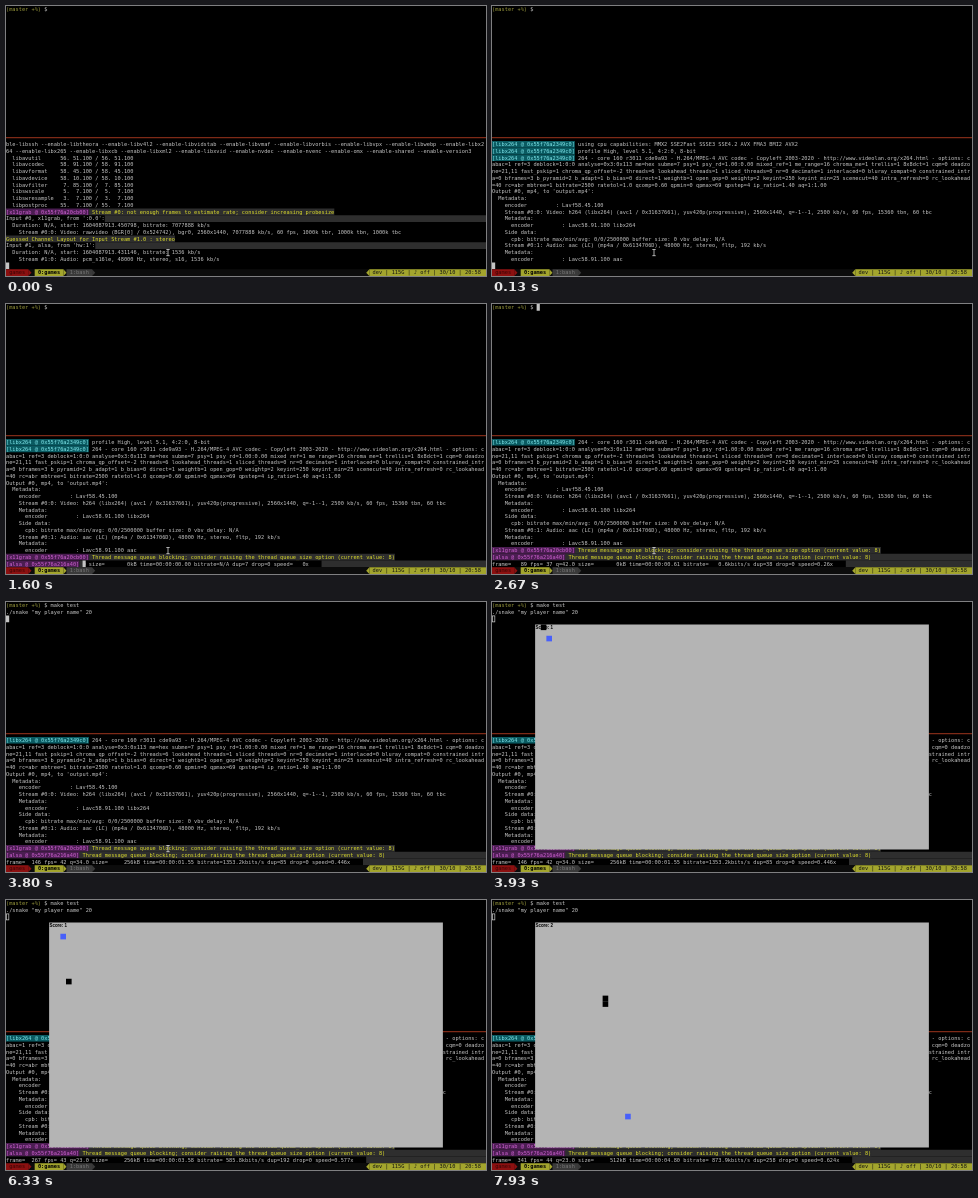
An HTML page with a canvas that plays this animation: 480x270 px, repeating every 8 s.

```html
<!DOCTYPE html>
<html lang="en">
<head>
<meta charset="utf-8">
<title>Terminal snake</title>
<style>
  html, body { margin: 0; width: 100%; height: 100%; overflow: hidden; background: #000; }
  canvas { display: block; }
</style>
</head>
<body>
<canvas width="480" height="270"></canvas>
<script>
const ctx = document.querySelector('canvas').getContext('2d');
const LOOP = 8000, COLS = 150, CW = 17, RH = 36;   // terminal cells on a 2560 x 1440 desktop
const MONO = '28.24px "DejaVu Sans Mono", monospace';
const FG = '#c4c4c4', GRAY = '#2e2e2e', WARN = '#dede2c', OLIVE = '#a3a52d';
const QUEUE = 'Thread message queue blocking; consider raising the thread_queue_size option (current value: 8)';
const X264 = '[libx264 @ 0x55f76a2349c0] ', GRAB = '[x11grab @ 0x55f76a20cb00] ', ALSA = '[alsa @ 0x55f76a216a40] ';

const log = `ble-libssh --enable-libtheora --enable-libv4l2 --enable-libvidstab --enable-libvmaf --enable-libvorbis --enable-libvpx --enable-libwebp --enable-libx264 --enable-libx265 --enable-libxcb --enable-libxml2 --enable-libxvid --enable-nvdec --enable-nvenc --enable-omx --enable-shared --enable-version3
  libavutil      56. 51.100 / 56. 51.100
  libavcodec     58. 91.100 / 58. 91.100
  libavformat    58. 45.100 / 58. 45.100
  libavdevice    58. 10.100 / 58. 10.100
  libavfilter     7. 85.100 /  7. 85.100
  libswscale      5.  7.100 /  5.  7.100
  libswresample   3.  7.100 /  3.  7.100
  libpostproc    55.  7.100 / 55.  7.100
${GRAB}Stream #0: not enough frames to estimate rate; consider increasing probesize
Input #0, x11grab, from ':0.0':
  Duration: N/A, start: 1604087913.450798, bitrate: 7077888 kb/s
    Stream #0:0: Video: rawvideo (BGR[0] / 0x524742), bgr0, 2560x1440, 7077888 kb/s, 60 fps, 1000k tbr, 1000k tbn, 1000k tbc
Guessed Channel Layout for Input Stream #1.0 : stereo
Input #1, alsa, from 'hw:1':
  Duration: N/A, start: 1604087913.431146, bitrate: 1536 kb/s
    Stream #1:0: Audio: pcm_s16le, 48000 Hz, stereo, s16, 1536 kb/s
Stream mapping:
  Stream #0:0 -> #0:0 (rawvideo (native) -> h264 (libx264))
  Stream #1:0 -> #0:1 (pcm_s16le (native) -> aac (native))
Press [q] to stop, [?] for help
${X264}using cpu capabilities: MMX2 SSE2Fast SSSE3 SSE4.2 AVX FMA3 BMI2 AVX2
${X264}profile High, level 5.1, 4:2:0, 8-bit
${X264}264 - core 160 r3011 cde9a93 - H.264/MPEG-4 AVC codec - Copyleft 2003-2020 - http://www.videolan.org/x264.html - options: cabac=1 ref=3 deblock=1:0:0 analyse=0x3:0x113 me=hex subme=7 psy=1 psy_rd=1.00:0.00 mixed_ref=1 me_range=16 chroma_me=1 trellis=1 8x8dct=1 cqm=0 deadzone=21,11 fast_pskip=1 chroma_qp_offset=-2 threads=6 lookahead_threads=1 sliced_threads=0 nr=0 decimate=1 interlaced=0 bluray_compat=0 constrained_intra=0 bframes=3 b_pyramid=2 b_adapt=1 b_bias=0 direct=1 weightb=1 open_gop=0 weightp=2 keyint=250 keyint_min=25 scenecut=40 intra_refresh=0 rc_lookahead=40 rc=abr mbtree=1 bitrate=2500 ratetol=1.0 qcomp=0.60 qpmin=0 qpmax=69 qpstep=4 ip_ratio=1.40 aq=1:1.00
Output #0, mp4, to 'output.mp4':
  Metadata:
    encoder         : Lavf58.45.100
    Stream #0:0: Video: h264 (libx264) (avc1 / 0x31637661), yuv420p(progressive), 2560x1440, q=-1--1, 2500 kb/s, 60 fps, 15360 tbn, 60 tbc
    Metadata:
      encoder         : Lavc58.91.100 libx264
    Side data:
      cpb: bitrate max/min/avg: 0/0/2500000 buffer size: 0 vbv_delay: N/A
    Stream #0:1: Audio: aac (LC) (mp4a / 0x6134706D), 48000 Hz, stereo, fltp, 192 kb/s
    Metadata:
      encoder         : Lavc58.91.100 aac
${GRAB}${QUEUE}
${ALSA}${QUEUE}`.split('\n').flatMap(line => line.match(/.{1,150}/g));

const isWarning = line => /^(\[x11grab|\[alsa|Guessed)/.test(line);

// elapsed s, encoded s, quantiser, kB written, duplicated frames
const stats = [
  [1.8, 0.15, 0, 0.047, 18], [2.374, 0.6163, 42, 0.047, 38], [2.9, 1.07, 38, 0.047, 61],
  [3.475, 1.55, 34, 256, 85], [4.09, 2, 28, 256, 109], [4.94, 2.55, 23, 256, 137],
  [5.6, 3.08, 23, 256, 165], [6.2, 3.58, 23, 256, 192], [7.05, 4.3, 23, 512, 231],
  [7.69, 4.8, 23, 512, 258]
];

// moments at which the screen refreshes once the game runs
const refreshes = [3930, 4130, 4200, 4400, 4470, 5000, 5070, 5330, 5400, 5670,
  5870, 6000, 6270, 6330, 7130, 7200, 7470, 7530, 7730, 7930];

const corners = [[0, 0], [21, 0], [21, 10], [2, 10], [2, 2], [12, 2], [12, 14]];
const path = [corners[0]];
for (const [cx, cy] of corners.slice(1)) {
  let [x, y] = path[path.length - 1];
  while (x !== cx || y !== cy) path.push([x += Math.sign(cx - x), y += Math.sign(cy - y)]);
}

function rect(x, y, w, h, color) {
  ctx.fillStyle = color;
  ctx.fillRect(x, y, w, h);
}

function put(row, col, text, color = FG, bg, weight = '') {
  if (bg) rect(col * CW, row * RH, text.length * CW, RH, bg);
  ctx.font = `${weight} ${MONO}`;
  ctx.fillStyle = color;
  ctx.fillText(text, col * CW, row * RH + 27);
}

function putLog(row, line) {
  const tag = (line.match(/^\[\w+ @ \w+\]/) || [''])[0];
  const warning = isWarning(line);
  put(row, tag.length, line.slice(tag.length), warning ? WARN : FG, warning ? GRAY : '#000');
  if (!tag) return;
  if (warning) put(row, 0, tag, '#cf62d2', '#4b1d52');
  else put(row, 0, tag, '#7fe6ea', '#0a5a61');
}

function statsLine(time) {
  if (time < 600) return '';
  const entry = stats.filter(s => time >= s[0] * 1000 + 40).pop();
  if (!entry) return 'frame=    0 fps=0.0 q=0.0 size=       0kB time=00:00:00.00 bitrate=N/A dup=7 drop=0 speed=   0x    ';
  const [elapsed, sec, q, kb, dup] = entry;
  const pad = (value, width) => String(value).padStart(width);
  const frame = Math.floor(sec * 60 + 53.01);
  const clock = (Math.floor(sec * 100 + 1e-6) / 100).toFixed(2);
  const rate = (kb * 8.192 / (sec - 0.00023)).toFixed(1);
  return `frame=${pad(frame, 5)} fps=${pad((frame / elapsed).toFixed(0), 3)} q=${q.toFixed(1)} ` +
    `size=${pad(kb.toFixed(0), 8)}kB time=00:00:0${clock} bitrate=${pad(rate, 6)}kbits/s ` +
    `dup=${dup} drop=0 speed=${+(sec / elapsed).toPrecision(3)}x    `;
}

function drawTop(time) {
  put(0, 0, '(master +%)', '#9a9a3c');
  const typed = Math.max(0, Math.min(9, Math.floor((time - 2870) / 85) + 1));
  put(0, 12, '$ ' + 'make test'.slice(0, typed));
  if (time >= 3730) put(1, 0, './snake "my player name" 20');
  if (time >= 3930) {
    ctx.strokeStyle = FG;
    ctx.lineWidth = 4;
    ctx.strokeRect(2, 2 * RH + 2, CW - 4, RH - 4);
  } else if (time >= 3730) rect(0, 2 * RH, CW, RH, FG);
  else if (time >= 1930) rect((14 + typed) * CW, 0, CW, RH, FG);
}

function drawLog(time) {
  const count = time < 70 ? 18 : time < 130 ? 22 : time < 270 ? 40 : time < 1670 ? 41 : 42;
  for (let i = 0; i <= 18; i++) {
    const index = count - 18 + i, row = 20 + i;
    if (index && isWarning(log[index - 1])) rect(0, row * RH, 2560, RH, GRAY);
    if (i < 18) putLog(row, log[index]);
  }
  put(38, 0, statsLine(time), FG, '#000');
  const tagging = time >= 1600 && time < 1670;
  if (tagging) putLog(38, ALSA);
  if (time < 1930) rect(tagging ? 24 * CW : 0, 38 * RH, CW, RH, FG);
}

function segment(col, width, color, dir) {
  const x = col * CW, y = 39 * RH, edge = dir > 0 ? x + width * CW : x;
  rect(x, y, width * CW, RH, color);
  ctx.beginPath();
  ctx.moveTo(edge, y);
  ctx.lineTo(edge + dir * CW, y + RH / 2);
  ctx.lineTo(edge, y + RH);
  ctx.fill();
}

function drawStatus() {
  rect(0, 39 * RH, 2560, RH, '#0c0c0c');
  segment(0, 7, '#8c1010', 1);
  put(39, 1, 'games', '#3a0505');
  segment(9, 9, OLIVE, 1);
  put(39, 10, '0:games', '#000', null, 'bold');
  segment(19, 8, '#3a3a3a', 1);
  put(39, 20, '1:bash', '#777');
  segment(114, 37, OLIVE, -1);
  put(39, 115, 'dev | 115G | ♪ off | 30/10 | 20:58', '#111');
}

function drawPointer() {
  rect(862, 1298, 4, 34, '#ddd');
  rect(855, 1296, 18, 4, '#ddd');
  rect(855, 1330, 18, 4, '#ddd');
}

function drawGame(time) {
  const left = 230, top = 120, cell = 30;
  const block = ([x, y], color) => rect(left + x * cell, top + y * cell, cell, cell, color);
  const head = Math.min(path.length - 1, Math.floor((time - 3850) / 50));
  const score = head < 58 ? 1 : 2;
  rect(left, top, 70 * cell, 40 * cell, '#b4b4b4');
  block(score === 1 ? [2, 2] : [16, 34], '#4860fa');
  for (let i = 0; i < score; i++) block(path[head - i], '#000');
  ctx.font = 'bold 23.5px "Liberation Sans", sans-serif';
  ctx.fillText(`Score: ${score}`, left + 2, top + 25);
}

function draw() {
  const now = performance.now() % LOOP;
  const time = now < refreshes[0] ? now : refreshes.filter(r => r <= now).pop();
  ctx.setTransform(3 / 16, 0, 0, 3 / 16, 0, 0);
  rect(0, 0, 2560, 1440, '#000');
  drawTop(time);
  rect(0, 19 * RH + 16, 2560, 5, '#a8391f');
  drawLog(time);
  drawStatus();
  if (time < refreshes[0]) drawPointer();
  else drawGame(time);
  requestAnimationFrame(draw);
}
draw();
</script>
</body>
</html>
```
